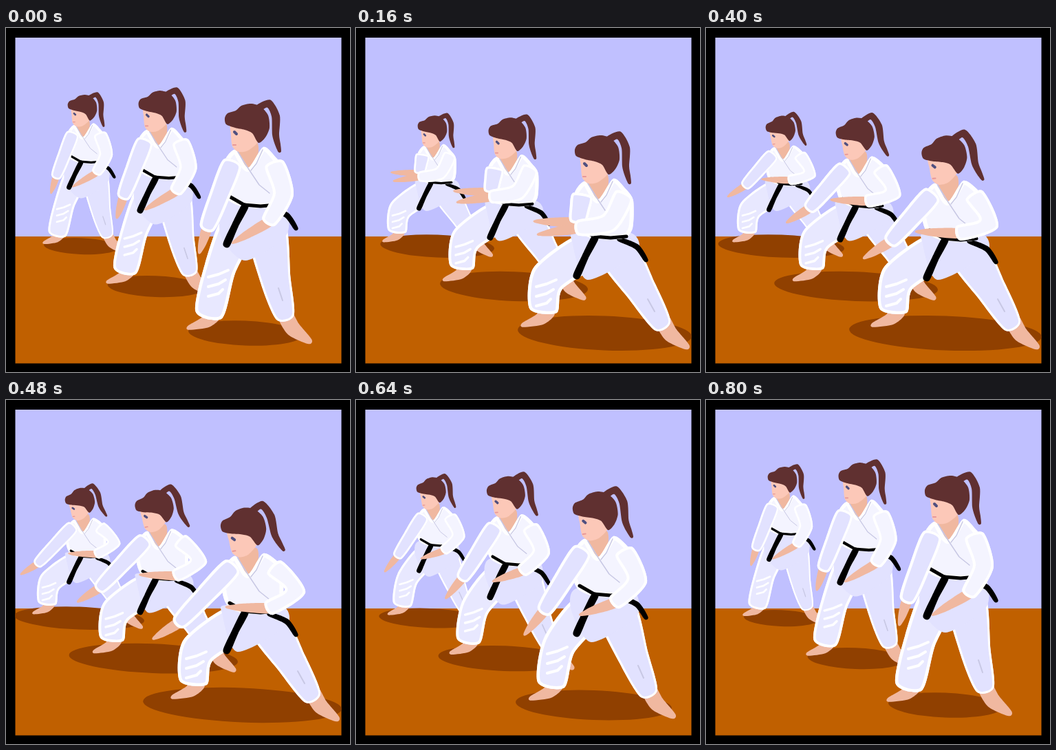
An HTML page with a canvas for the animation above (0.88 s loop, 500 px wide and 500 px high).

```html
<!DOCTYPE html>
<html lang="en">
<head>
<meta charset="utf-8">
<title>Karate class</title>
<style>
html, body { margin: 0; width: 100%; height: 100%; overflow: hidden; background: #000; }
canvas { display: block; }
</style>
</head>
<body>
<canvas id="stage" width="500" height="500"></canvas>
<script>
const ctx = document.getElementById('stage').getContext('2d');
const STEP = 80, STEPS = 11;
const SKY = '#c0c0ff', FLOOR = '#c06000', SHADOW = '#904000';
const HAIR = '#603030', SKIN = '#f0b8a0', FACE = '#fcc8b8';
const CLOTH = '#e2e2ff', BRIGHT = '#f4f4ff', FOLD = '#c8c8e4';

// stance: how far the body sinks; lean: how far the block is carried through.
// Each arm gives its wrist and fingertip in the space of the front figure.
const ready  = { stance: 0, lean: 0,   left: [[292, 291], [281, 327]], right: [[382, 282], [330, 312]] };
const gather = { stance: 1, lean: 0,   left: [[318, 287], [262, 318]], right: [[345, 284], [288, 296]] };
const reach  = { stance: 2, lean: 0,   left: [[322, 283], [260, 281]], right: [[322, 291], [265, 300]] };
const sweep  = { stance: 2, lean: 0.5, left: [[284, 298], [245, 322]], right: [[352, 294], [291, 291]] };
const block  = { stance: 2, lean: 1,   left: [[251, 324], [214, 347]], right: [[382, 303], [321, 301]] };
const rise   = { stance: 1, lean: 0.5, left: [[273, 307], [245, 341]], right: [[376, 295], [326, 312]] };
const poses = [ready, gather, reach, sweep, block, rise, ready];

const figures = [
  { x: -118.6, y: 24.4, sx: 0.655, sy: 0.66 },
  { x: -77.7, y: -2.7, sx: 0.85, sy: 0.853 },
  { x: 0, y: 0, sx: 1, sy: 1 }
];

function mix(a, b, t) {
  return Array.isArray(a) ? a.map((v, i) => mix(v, b[i], t)) : a + (b - a) * t;
}

function poseAt(beat) {
  const i = Math.floor(beat), a = poses[i], b = poses[Math.min(i + 1, poses.length - 1)];
  const pose = {};
  for (const key in a) pose[key] = mix(a[key], b[key], beat - i);
  return pose;
}

// Closed Catmull-Rom outline with a slightly tight tension.
function outline(pts) {
  const n = pts.length, k = 0.13, at = i => pts[(i + n) % n];
  ctx.beginPath();
  ctx.moveTo(...pts[0]);
  for (let i = 0; i < n; i++) {
    const [ax, ay] = at(i - 1), [bx, by] = at(i), [cx, cy] = at(i + 1), [dx, dy] = at(i + 2);
    ctx.bezierCurveTo(bx + (cx - ax) * k, by + (cy - ay) * k, cx - (dx - bx) * k, cy - (dy - by) * k, cx, cy);
  }
  ctx.closePath();
}

function blob(pts, color, rim = 0) {
  outline(pts);
  ctx.fillStyle = color;
  ctx.fill();
  if (!rim) return;
  ctx.save();
  ctx.clip();
  ctx.strokeStyle = '#fff';
  ctx.lineWidth = rim;
  ctx.stroke();
  ctx.restore();
}

// A tapered limb along joints [x, y, radius].
function limb(joints, color, rim) {
  const side = sign => joints.map(([x, y, r], i) => {
    const [ax, ay] = joints[Math.max(i - 1, 0)];
    const [bx, by] = joints[Math.min(i + 1, joints.length - 1)];
    const k = sign * r / Math.hypot(bx - ax, by - ay);
    return [x - (by - ay) * k, y + (bx - ax) * k];
  });
  blob([...side(1), ...side(-1).reverse()], color, rim);
}

function line(pts, color, width) {
  ctx.beginPath();
  for (const p of pts) ctx.lineTo(...p);
  ctx.strokeStyle = color;
  ctx.lineWidth = width;
  ctx.stroke();
}

function shifted(x, y, draw) {
  ctx.save();
  ctx.translate(x, y);
  draw();
  ctx.restore();
}

function drawShadow(k, lean) {
  const left = 265 - 15 * k - 36 * lean, right = 430 + 29 * k;
  ctx.fillStyle = SHADOW;
  ctx.beginPath();
  ctx.ellipse((left + right) / 2, 443.5, (right - left) / 2, 18 + 3.5 * k, 0.04, 0, Math.PI * 2);
  ctx.fill();
}

function drawLegs(k) {
  shifted(-11.5 * k, -2 * k, () => limb([[301, 412, 13], [291, 427, 9], [265, 436, 3]], SKIN));
  shifted(20 * k, 4 * k, () => limb([[404, 414, 10], [418, 438, 11], [442, 456, 4]], SKIN));
  const hip = 285 + 18 * k, kneeX = 311 - 16 * k, kneeY = 350 + 7 * k;
  limb([[378, hip, 27], [392 + 12 * k, 367 + 8 * k, 22], [406 + 20 * k, 421 + 6 * k, 13]], CLOTH, 6);
  limb([[338, hip, 24], [kneeX, kneeY, 23 + 1.5 * k], [295 - 11.5 * k, 417 - 3 * k, 20]], '#e8e8ff', 9);
  blob([[320, 250 + 24 * k], [400, 250 + 24 * k], [408, 300 + 14 * k], [348 - 6 * k, 338 + 14 * k], [312 + k, 302 + 4 * k]], CLOTH);
  // Creases fan out below the knee.
  for (let i = 0; i < 3; i++) {
    const y = kneeY + 6 + 14 * i;
    line([[kneeX - 17, y + 6], [kneeX - 2, y + 2], [kneeX + 12 - 4 * i, y - 4]], '#fff', 4);
  }
  line([[396 + 14 * k, 378 + 8 * k], [402 + 16 * k, 396 + 8 * k]], FOLD, 2);
}

function drawBody(lean) {
  limb([[382, 261, 3], [408, 272, 4], [422, 292, 3]], '#000');
  blob([[337, 172], [364, 165], [366, 185], [350, 206], [344, 192]], SKIN);
  blob([[334, 177], [321, 187], [314, 206], [315, 232], [323, 250], [346, 260], [388, 260], [402, 245],
    [403, 205], [392 + 6 * lean, 188], [374, 173], [352, 203]], BRIGHT, 12);
  line([[337, 180], [352, 204], [368, 228], [383, 240]], FOLD, 1.5);
  line([[373, 177], [364, 197], [356, 207]], FOLD, 1.5);
  line([[325, 245], [346, 257], [370, 259], [393, 257]], '#000', 5);
  limb([[348, 258, 5], [333, 287, 5], [320, 316, 5]], '#000');
}

function drawArm(shoulder, elbow, [wrist, tip], color) {
  const palm = mix(wrist, tip, 0.6);
  limb([[...wrist, 7], [...palm, 6], [...tip, 2]], SKIN);
  limb([[...shoulder, 14], [...elbow, 15], [...wrist, 11]], color, 8);
}

// The elbow of two equal bones, bent away from the body.
function bentElbow([ax, ay], [bx, by], bone) {
  const d = Math.hypot(bx - ax, by - ay);
  const k = Math.sqrt(Math.max(0, bone * bone - d * d / 4)) / d;
  return [(ax + bx) / 2 + (by - ay) * k, (ay + by) / 2 - (bx - ax) * k];
}

function drawArms({ left, right }, drop) {
  const near = [390, 197 + drop], far = [329, 196 + drop];
  drawArm(far, mix(far, left[0], 0.5), left, CLOTH);
  drawArm(near, bentElbow(near, right[0], 46), right, BRIGHT);
}

function drawHead(lean) {
  ctx.save();
  ctx.translate(355, 175);
  ctx.rotate(-0.15 * lean);
  ctx.translate(-355, -175);
  limb([[366, 117, 5], [382, 110, 6], [392, 128, 6], [392 + 2 * lean, 155, 5], [395 + 4 * lean, 169, 4], [398 + 6 * lean, 180, 2]], HAIR);
  blob([[328, 138], [327, 155], [329, 172], [338, 180], [352, 178], [367, 164], [363, 143]], FACE);
  blob([[318, 131], [322, 124], [334, 120], [342, 113], [356, 110], [370, 114], [381, 127], [383, 145],
    [377, 159], [367, 167], [358, 153], [347, 148], [333, 145], [320, 140]], HAIR);
  line([[332, 151], [335, 154]], '#505080', 4);
  line([[330, 170], [334, 170]], '#e89898', 2);
  ctx.restore();
}

function drawFigure(place, pose) {
  const { stance, lean } = pose, drop = 23 * stance;
  ctx.save();
  ctx.translate(place.x, place.y);
  ctx.scale(place.sx, place.sy);
  drawShadow(stance, lean);
  drawLegs(stance);
  shifted(0, drop + 4 * lean, () => drawBody(lean));
  drawArms(pose, drop);
  shifted(0, drop, () => drawHead(lean));
  ctx.restore();
}

function render(now) {
  const step = Math.floor(now / STEP) % STEPS;
  const pose = poseAt(step < 2 ? step : 1 + step / 2);
  ctx.fillStyle = '#000';
  ctx.fillRect(0, 0, 500, 500);
  ctx.save();
  ctx.beginPath();
  ctx.rect(13.5, 14, 474, 473.5);
  ctx.clip();
  ctx.fillStyle = SKY;
  ctx.fillRect(0, 0, 500, 303);
  ctx.fillStyle = FLOOR;
  ctx.fillRect(0, 303, 500, 197);
  for (const place of figures) drawFigure(place, pose);
  ctx.restore();
}

ctx.lineJoin = ctx.lineCap = 'round';
let start;
function tick(now) {
  start ??= now;
  render(now - start);
  requestAnimationFrame(tick);
}
render(0);
requestAnimationFrame(tick);
</script>
</body>
</html>
```
